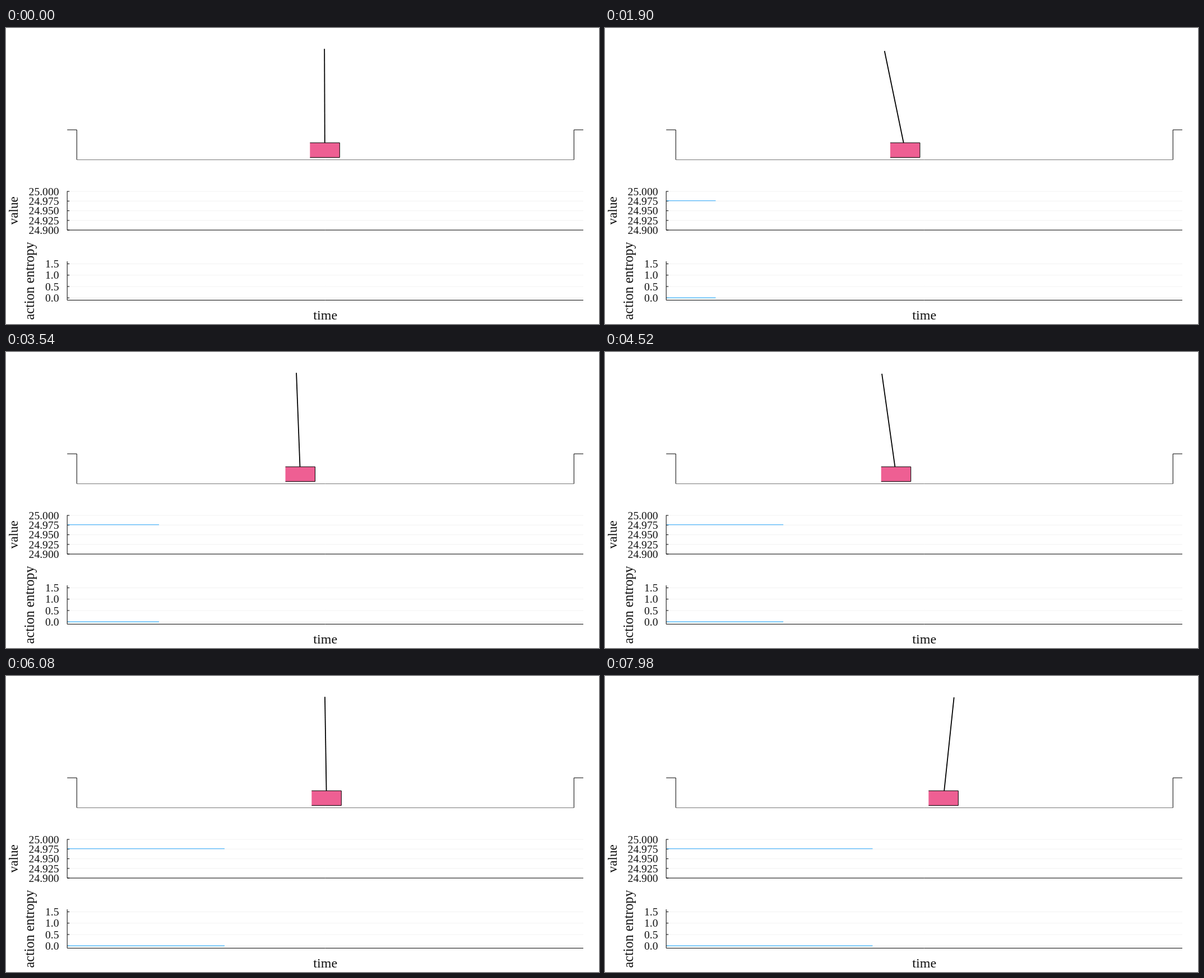
Write an HTML page with a canvas that moves like this. It is 1058 by 529 pixels and loops after 8000 ms.

```html
<!DOCTYPE html>
<html>
<head>
<meta charset="utf-8">
<style>
  html, body { margin: 0; width: 100%; height: 100%; overflow: hidden; background: #fff; }
  canvas { display: block; }
</style>
</head>
<body>
<canvas id="stage" width="1058" height="529"></canvas>
<script>
const ctx = document.getElementById('stage').getContext('2d');
const LOOP = 8000, STEP = 20;
const LEFT = 109.2, RIGHT = 1030;
const FLOOR = 235.5, LEDGE = 182, WALL_LEFT = 126.3, WALL_RIGHT = 1013.3;
const CART = { top: 205.1, width: 53, height: 26.3 };
const POLE = { pivot: 218.2, length: 181 };
const INK = '#111';

// Turning points of the sway: lean in degrees, positive to the right
const poses = [
  { time: 0, x: 568.8, lean: -0.2 },
  { time: 1640, x: 587, lean: -8 },
  { time: 1900, x: 535.4, lean: -11.7 },
  { time: 3540, x: 525, lean: -2.2 },
  { time: 4520, x: 519.2, lean: -8 },
  { time: 6080, x: 571.8, lean: -0.9 },
  { time: 7180, x: 604.2, lean: -0.2 },
  { time: LOOP, x: 603.8, lean: 6 }
];

const mix = (a, b, u) => a + (b - a) * u;
const ease = u => u * u * (3 - 2 * u);

function poseAt(t) {
  const next = poses.findIndex(pose => pose.time > t);
  const a = poses[next - 1], b = poses[next];
  const u = ease((t - a.time) / (b.time - a.time));
  return { x: mix(a.x, b.x, u), lean: mix(a.lean, b.lean, u) * Math.PI / 180 };
}

function line(points, color = '#000', width = 1) {
  ctx.beginPath();
  points.forEach(([x, y]) => ctx.lineTo(x, y));
  ctx.strokeStyle = color;
  ctx.lineWidth = width;
  ctx.stroke();
}

function text(label, x, y, size, align = 'center', angle = 0) {
  ctx.save();
  ctx.translate(x, y);
  ctx.rotate(angle);
  ctx.font = `${size}px "Liberation Serif", serif`;
  ctx.textAlign = align;
  ctx.fillStyle = INK;
  ctx.fillText(label, 0, 0);
  ctx.restore();
}

function drawTrack() {
  line([[LEFT, LEDGE], [WALL_LEFT, LEDGE], [WALL_LEFT, FLOOR]]);
  line([[WALL_RIGHT, FLOOR], [WALL_RIGHT, LEDGE], [RIGHT, LEDGE]]);
  line([[WALL_LEFT, FLOOR], [WALL_RIGHT, FLOOR]], '#777');
}

function drawCart({ x, lean }) {
  const { pivot, length } = POLE;
  line([[x, pivot], [x + length * Math.sin(lean), pivot - length * Math.cos(lean)]], '#000', 1.8);

  const left = x - CART.width / 2, right = left + CART.width;
  const bottom = CART.top + CART.height;
  ctx.fillStyle = '#ee5f93';
  ctx.fillRect(left, CART.top, CART.width, CART.height);
  line([[left, CART.top], [right, CART.top], [right, bottom], [left, bottom]]);
}

function drawChart({ top, bottom, zero, gap, count, min, step, digits, data }, end) {
  const ticks = Array.from({ length: count }, (_, i) => zero - i * gap);
  ticks.forEach(y => line([[LEFT, y], [RIGHT, y]], '#f2f2f2'));
  line([[LEFT, top], [LEFT, bottom], [RIGHT, bottom]]);
  ticks.forEach((y, i) => {
    line([[LEFT, y], [LEFT + 4, y]]);
    text((min + i * step).toFixed(digits), 94.5, y + 6.6, 19.6, 'right');
  });
  if (end > 110) line([[110, data], [end, data]], '#55b9fb', 1.4);
}

const valueChart = {
  top: 291.6, bottom: 361.1, zero: 361.2, gap: 17.3, count: 5,
  min: 24.9, step: 0.025, digits: 3, data: 308.6
};
const entropyChart = {
  top: 417, bottom: 486.4, zero: 482.3, gap: 20.3, count: 4,
  min: 0, step: 0.5, digits: 1, data: 482.3
};

function draw(t) {
  ctx.fillStyle = '#fff';
  ctx.fillRect(0, 0, 1058, 529);

  drawTrack();
  drawCart(poseAt(t));

  const end = 110 + 0.921 * t / STEP;
  drawChart(valueChart, end);
  drawChart(entropyChart, end);

  text('value', 20.7, 326.3, 23.2, 'center', -Math.PI / 2);
  text('action entropy', 49.6, 452, 24.2, 'center', -Math.PI / 2);
  text('time', 569.7, 520.8, 24);
}

const start = performance.now();
function tick() {
  const t = Math.max(0, performance.now() - start) % LOOP;
  draw(Math.floor(t / STEP) * STEP);
  requestAnimationFrame(tick);
}
tick();
</script>
</body>
</html>
```
